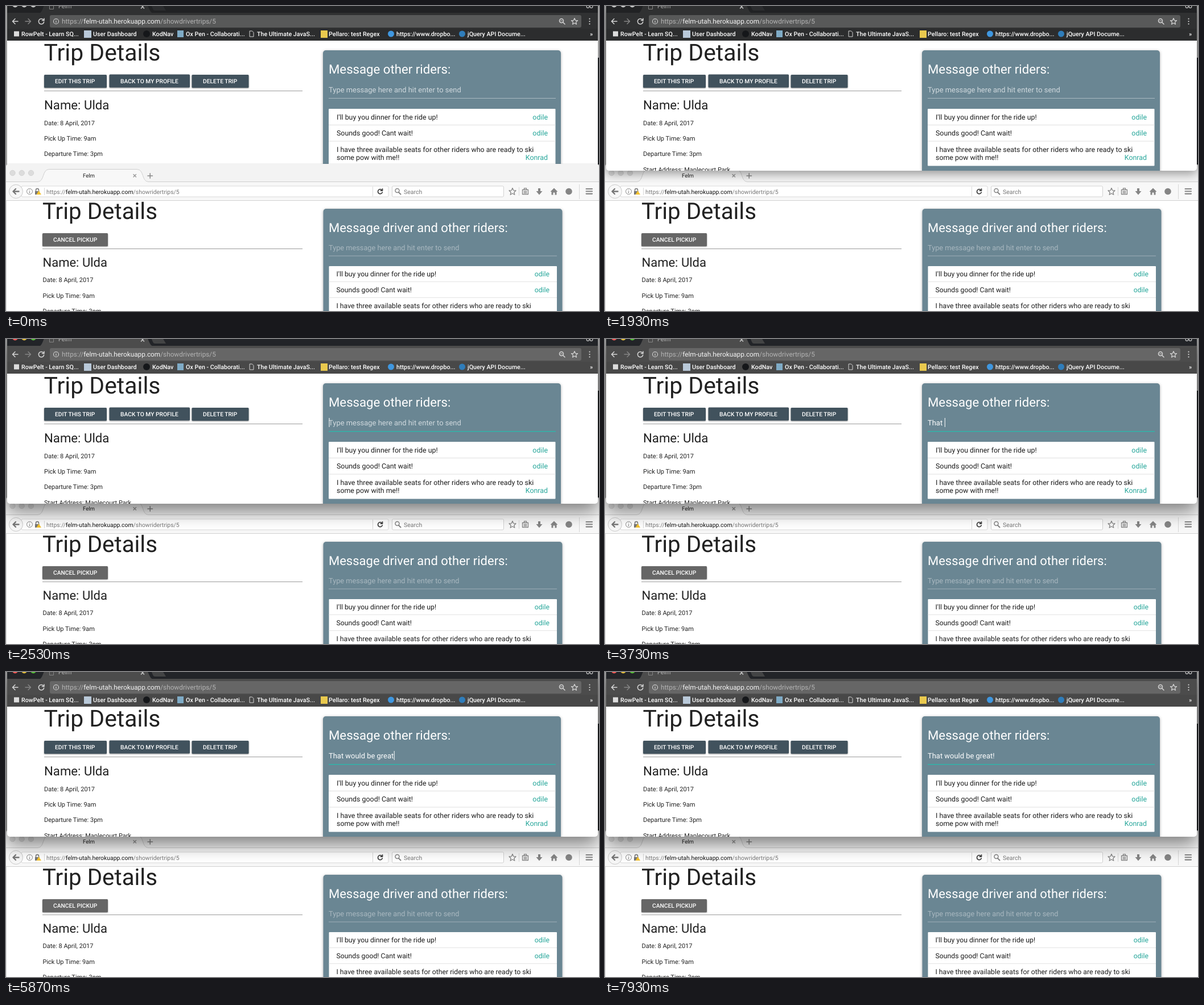
These frames come from a looping animation (1042 by 537 pixels, 8 s). An HTML page:

```html
<!DOCTYPE html>
<html lang="en">
<head>
<meta charset="utf-8">
<title>Trip Details</title>
<style>
  html, body { margin: 0; width: 100%; height: 100%; overflow: hidden; background: #a3a3a3; }
  body { position: relative; }
  svg { position: absolute; display: block; overflow: hidden; font-family: Roboto, sans-serif; text-rendering: geometricPrecision; }
  text { white-space: pre; }
  #edge { position: absolute; left: 1040px; top: 91px; width: 2px; height: 188px; background: #17191c; }
  #driver { left: 2px; top: 0; width: 1038px; height: 290px; background: #fff; border-radius: 0 0 5px 5px;
    --strip: #212224; --bar: #303132; --low: #2c2d2e; --field: #585959; --tab: #a9a9a9;
    --red: #c9c9c9; --yellow: #c9c9c9; --green: #c9c9c9; }
  #driver.front { z-index: 2; box-shadow: 0 5px 18px rgba(0,0,0,.4); }
  #driver.active { --strip: #222428; --bar: #4c4c4c; --low: #484848; --field: #666; --tab: #b5b5b5;
    --red: #fc5b57; --yellow: #e5bf3c; --green: #57c038;
    box-shadow: 0 12px 32px rgba(0,0,0,.5); }
  #rider { left: 0; top: 278px; width: 1042px; height: 259px; z-index: 1; background: #fff;
    border-radius: 5px 5px 0 0; box-shadow: 0 0 1px rgba(0,0,0,.5); }
  .ink { fill: #212121; }
  .msg { fill: #1c1c1c; }
  .teal { fill: #26a69a; }
  .w { fill: #fff; }
  .med { font-weight: 500; }
  .line { fill: none; stroke-width: 1.5; stroke-linecap: round; stroke-linejoin: round; }
  .panel { fill: #6a8693; filter: drop-shadow(0 1px 2.5px rgba(0,0,0,.3)); }
  .btn { filter: drop-shadow(0 1px 1px rgba(0,0,0,.4)); }
</style>
</head>
<body>
<div id="edge"></div>

<svg id="driver" viewBox="2 0 1038 290">
  <rect width="1042" height="14" style="fill:var(--strip)"/>
  <path d="M58 13C64 12 65 0 69 -3H247C251 0 252 12 259 13Z" style="fill:var(--bar)"/>
  <path d="M255 -2H275L281 8H262Q259 8 258 5Z" style="fill:var(--bar)" opacity=".8"/>
  <rect y="12" width="1042" height="29" style="fill:var(--bar)"/>
  <rect y="40" width="1042" height="21" style="fill:var(--low)"/>
  <circle cx="16" cy="-2.500" r="5" style="fill:var(--red)"/>
  <circle cx="32" cy="-2.500" r="5" style="fill:var(--yellow)"/>
  <circle cx="48" cy="-2.500" r="5" style="fill:var(--green)"/>
  <path d="M76.500 -3V5.500H83.500V-3" class="line" stroke="#858585" style="stroke-width:1"/>
  <path d="M237.500 -1.500L242.500 4M242.500 -1.500L237.500 4" class="line" stroke="#ccc"/>
  <g class="line" stroke="#c9c9c9" style="stroke-width:1.200">
    <circle cx="1022.500" cy="1" r="2.300"/><circle cx="1028.500" cy="1" r="2.300"/>
  </g>
  <rect x="77" y="16" width="934" height="22" rx="3" style="fill:var(--field)"/>
  <g class="line" stroke="#d6d6d6">
    <path d="M21 27H11.500M16 22.500L11.500 27L16 31.500"/>
    <path d="M34 27H43.500M39 22.500L43.500 27L39 31.500" stroke="#858585"/>
    <path d="M66 24.500A4.700 4.700 0 1 0 66.700 28"/>
    <path d="M67 22V25.500H63.500"/>
    <circle cx="88" cy="27" r="4.500" style="stroke-width:1.100"/>
    <path d="M88 26.500V29M88 24.500V24.600" style="stroke-width:1.200"/>
    <circle cx="976" cy="26" r="3.500"/>
    <path d="M979 29L982 32"/>
    <path d="M974.500 26H977.500" style="stroke-width:1"/>
    <path d="M999 21.500L1000.600 25.300L1004.600 25.600L1001.500 28.200L1002.500 32.200L999 30L995.500 32.200L996.500 28.200L993.400 25.600L997.400 25.300Z" style="stroke-width:1.200"/>
    <path d="M1025.500 22.500V22.600M1025.500 27V27.100M1025.500 31.500V31.600" style="stroke-width:2.200"/>
    <path d="M428.500 44H432.500L435 46.500V54H428.500Z" style="stroke-width:1"/>
  </g>
  <rect x="14" y="44.500" width="9" height="9" fill="#dcdcdc"/>
  <rect x="137" y="43" width="13" height="13" fill="#b9c9d9"/>
  <circle cx="247" cy="49" r="6" fill="#15171a"/>
  <rect x="301" y="43" width="11" height="12" fill="#7fabc6"/>
  <rect x="553" y="43" width="12" height="13" fill="#eac94e"/>
  <circle cx="676.500" cy="49" r="5.500" fill="#3f97e0"/>
  <circle cx="801.500" cy="49" r="5.500" fill="#2f7dbb"/>
  <g id="driverText"></g>
  <rect x="67" y="149" width="454" height="1" fill="#9b9b9b"/>
  <rect class="panel" x="557" y="78" width="418" height="230" rx="5"/>
  <rect x="567" y="162" width="399" height="1" fill="#a9b9c1"/>
  <rect id="under" x="567" y="162" width="399" height="1.500" fill="#2fb5aa" fill-opacity="0"/>
  <rect x="567" y="181" width="398.500" height="100.500" rx="1" fill="#fff"/>
  <path d="M567 209.500H965.500M567 238H965.500" stroke="#e0e0e0"/>
  <g id="driverPage"></g>
  <text id="typed" x="567" y="151.500" font-size="12.950"></text>
  <rect id="caret" y="139" width="1" height="16" fill="#fff" fill-opacity="0"/>
</svg>

<svg id="rider" viewBox="0 278 1042 259">
  <rect y="278" width="1042" height="32" fill="#f3f3f3"/>
  <rect y="309.500" width="1042" height="33" fill="#f8f8f8"/>
  <path d="M0 309.500H56C68 309 63 287.500 76 287.500H230C243 287.500 238 309 250 309.500H1042" fill="#f8f8f8" stroke="#cfcfcf"/>
  <rect y="342" width="1042" height="1" fill="#d0d0d0"/>
  <rect y="343" width="1" height="194" fill="#d8d8d8"/>
  <g fill="#dcdcdc" stroke="#cecece" stroke-width=".8">
    <circle cx="11.500" cy="294" r="4.700"/><circle cx="27.700" cy="294" r="4.700"/><circle cx="44" cy="294" r="4.700"/>
  </g>
  <g class="line" stroke="#9b9b9b">
    <path d="M224 296.500L228.500 301M228.500 296.500L224 301"/>
    <path d="M249 299H257.500M253.200 294.700V303.300" stroke="#888"/>
  </g>
  <rect x="27" y="317" width="645" height="19" rx="2" fill="#fff" stroke="#d9d9d9"/>
  <rect x="678.500" y="317" width="196" height="19" rx="2" fill="#fff" stroke="#d2d2d2"/>
  <circle cx="17.500" cy="326.500" r="12" fill="#f7f7f7" stroke="#c9c9c9"/>
  <path d="M22.500 326.500H13M17 322L12.500 326.500L17 331" class="line" stroke="#777" style="stroke-width:2.400"/>
  <circle cx="41.500" cy="326.500" r="5" fill="none" stroke="#888"/>
  <path d="M41.500 326V329.500M41.500 323.500V324.500" stroke="#888" stroke-width="1.200"/>
  <path d="M52.500 326V324A2.500 2.500 0 0 1 57.500 324V326" class="line" stroke="#777"/>
  <rect x="51" y="326" width="8" height="6" fill="#777"/>
  <path d="M57.500 325L62 332H53.500Z" fill="#f3c22f"/>
  <path d="M67.500 320V333M644.500 318V335M901.500 319V334M1007.500 314V340" stroke="#d8d8d8"/>
  <g class="line" stroke="#444" style="stroke-width:1.800">
    <path d="M660.500 324A4 4 0 1 0 661.300 328"/><path d="M661.500 322V325H658.500"/>
  </g>
  <g class="line" stroke="#858585">
    <circle cx="687.500" cy="325" r="3.500"/><path d="M690 328L693.500 331.500" style="stroke-width:2"/>
    <path d="M890 320.500L891.800 324.700L896 325L892.800 328L893.800 332.200L890 330L886.200 332.200L887.200 328L884 325L888.200 324.700Z" style="stroke-width:1.300"/>
    <path d="M907.500 323.500H917.500V331.500H907.500ZM910.500 323V320.800H914.500V323M910 326.500H915M910 329H915" style="stroke-width:1.300"/>
    <path d="M1019.500 322H1030M1019.500 326.300H1030M1019.500 330.600H1030" style="stroke-width:2.100"/>
  </g>
  <g fill="#858585">
    <path d="M935 321H939V326H942.500L937 332.500L931.500 326H935Z"/>
    <path d="M963 320.500L969.500 327H967.500V332.500H964.500V328.500H961.500V332.500H958.500V327H956.500Z"/>
    <circle cx="989" cy="326.500" r="5.800"/>
  </g>
  <rect x="64" y="427" width="457" height="1" fill="#9b9b9b"/>
  <rect class="panel" x="557.500" y="357" width="420" height="200" rx="5"/>
  <rect x="567" y="439.500" width="401" height="1" fill="#9db0b9"/>
  <rect x="567.500" y="458" width="400.500" height="90" rx="1" fill="#fff"/>
  <path d="M567.500 485.500H968M567.500 513.500H968" stroke="#e4e4e4"/>
  <g id="riderPage"></g>
</svg>

<script>
const $ = id => document.getElementById(id);
const NS = "http://www.w3.org/2000/svg";

function add(box, name, attrs, str = "") {
  const el = document.createElementNS(NS, name);
  for (const k in attrs) el.setAttribute(k, attrs[k]);
  el.textContent = str;
  return box.appendChild(el);
}
const put = (box, x, y, size, str, cls = "ink", more = {}) =>
  add(box, "text", { x, y, "font-size": size, class: cls, ...more }, str);
const right = { "text-anchor": "end" };

function address(box, x, y, size, path, dim, bright) {
  const el = put(box, x, y, size, "");
  [["https://", dim], ["felm-utah.herokuapp.com", bright], [path, dim]]
    .forEach(([s, fill]) => add(el, "tspan", { style: "fill:" + fill }, s));
}
function button(box, x, y, w, textX, label, fill) {
  add(box, "rect", { x, y, width: w, height: 23, rx: 1.5, fill, class: "btn" });
  put(box, textX, y + 15.3, 10.25, label, "w med");
}

const bar = $("driverText"), top1 = $("driverPage"), top2 = $("riderPage");

put(bar, 92, 4, 10.7, "Felm", "", { style: "fill:var(--tab)" });
address(bar, 98, 31, 11.8, "/showdrivertrips/5", "#b4b4b4", "#f4f4f4");
[[27, "RowPelt - Learn SQ..."], [153, "User Dashboard"], [257, "KodNav"],
 [316, "Ox Pen - Collaborati..."], [441, "The Ultimate JavaS..."], [567, "Pellaro: test Regex"],
 [686, "https://www.dropbo..."], [811, "jQuery API Docume..."], [1026, "»"]]
  .forEach(([x, s]) => put(bar, x, 53, 10.7, s, "w med"));

put(top1, 66.5, 96, 40.9, "Trip Details");
button(top1, 67, 121, 110, 86, "EDIT THIS TRIP", "#41525d");
button(top1, 181.5, 120.5, 141.5, 201, "BACK TO MY PROFILE", "#41525d");
button(top1, 326.5, 121, 100, 346, "DELETE TRIP", "#41525d");
put(top1, 67, 181.5, 22.2, "Name: Ulda");
["Date: 8 April, 2017", "Pick Up Time: 9am", "Departure Time: 3pm", "Start Address: Maplecourt Park"]
  .forEach((s, i) => put(top1, 67, 210 + 27.2 * i, 11, s));
put(top1, 567, 119, 22.2, "Message other riders:", "w");
put(top1, 581, 199.5, 12.4, "I'll buy you dinner for the ride up!", "msg");
put(top1, 581, 228, 12.4, "Sounds good! Cant wait!", "msg");
put(top1, 581, 256.5, 12.4, "I have three available seats for other riders who are ready to ski", "msg");
put(top1, 581, 271, 12.4, "some pow with me!!", "msg");
[[199.5, "odile"], [228, "odile"], [271, "Konrad"]]
  .forEach(([y, s]) => put(top1, 952, y, 12.4, s, "teal", right));

put(top2, 135, 302, 9.6, "Felm");
address(top2, 71, 330.5, 10.4, "/showridertrips/5", "#777", "#111");
put(top2, 699, 330.5, 10.5, "Search", "", { fill: "#777" });
put(top2, 64, 375, 40.3, "Trip Details");
button(top2, 64, 400, 115, 83, "CANCEL PICKUP", "#666");
put(top2, 64.5, 459, 22, "Name: Ulda");
["Date: 8 April, 2017", "Pick Up Time: 9am", "Departure Time: 3pm"]
  .forEach((s, i) => put(top2, 64.5, 486.3 + 27.4 * i, 11, s));
put(top2, 567, 397.5, 22, "Message driver and other riders:", "w");
put(top2, 567, 429.5, 12.75, "Type message here and hit enter to send", "", { fill: "#a9b8c0" });
put(top2, 580.5, 476, 12.25, "I'll buy you dinner for the ride up!", "msg");
put(top2, 580.5, 504, 12.25, "Sounds good! Cant wait!", "msg");
put(top2, 580.5, 531.5, 12.25, "I have three available seats for other riders who are ready to ski", "msg");
[476, 504].forEach(y => put(top2, 955, y, 12.25, "odile", "teal", right));

const LOOP = 8000, RAISE = 1870, ACTIVE = 2000, FOCUS = 2270;
const FIRST = 3130, STEP = 150, LAST = 6300;
const hint = "Type message here and hit enter to send", words = "That would be great";

function draw(now) {
  const t = now % LOOP, win = $("driver"), typed = $("typed");
  win.classList.toggle("front", t >= RAISE);
  win.classList.toggle("active", t >= ACTIVE);

  const n = t < FIRST ? 0 : Math.min(words.length, 1 + Math.floor((t - FIRST) / STEP));
  const str = words.slice(0, n) + (t >= LAST ? "!" : "");
  typed.textContent = str || hint;
  typed.setAttribute("fill", str ? "#fff" : "#d0d9de");

  const key = t >= LAST ? LAST : n ? FIRST + (n - 1) * STEP : FOCUS;
  const shown = t >= FOCUS && (t - key) % 1000 < 500;
  $("caret").setAttribute("x", 567.5 + (str ? typed.getComputedTextLength() : 0));
  $("caret").setAttribute("fill-opacity", shown ? 1 : 0);
  $("under").setAttribute("fill-opacity", Math.max(0, Math.min(1, (t - FOCUS) / 200)));
}

const start = performance.now();
(function tick() {
  draw(performance.now() - start);
  requestAnimationFrame(tick);
})();
</script>
</body>
</html>
```
